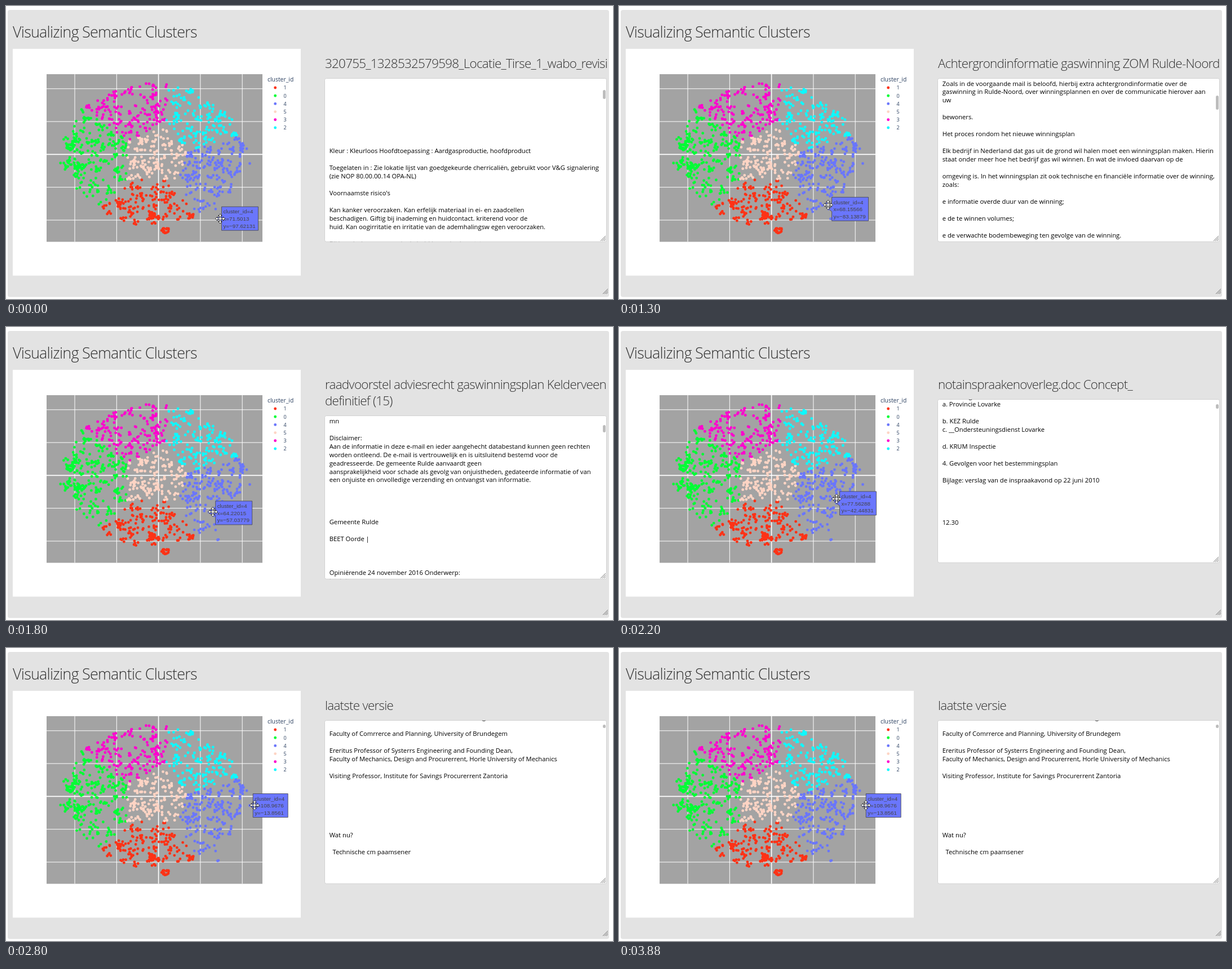
Recreate the animation shown at these times as an HTML page. Size 1077 px wide and 520 px high, loop 3980 ms.

```html
<!DOCTYPE html>
<html lang="en">
<head>
<meta charset="utf-8">
<title>Semantic clusters</title>
<style>
  html, body { margin: 0; width: 100%; height: 100%; overflow: hidden; background: #fff; }
  svg { display: block; width: 100vw; height: 100vh; font-family: "Open Sans", sans-serif; }
  text { white-space: pre; }
  .h2 { font-size: 26.95px; font-weight: 300; letter-spacing: -.745px; fill: #323232; }
  .h3 { font-size: 22.42px; font-weight: 300; letter-spacing: -.745px; fill: #323232; }
  .body { font-size: 11.24px; fill: #000; }
  .legend { font-size: 9px; fill: #2a3f5f; }
  .legend-title { font-size: 10.4px; fill: #2a3f5f; }
  .tip { font: 9.8px "Liberation Sans", Arial, sans-serif; fill: #444; }
  .dots { fill: none; stroke-width: 4.9; stroke-linecap: round; }
  .grid { stroke: #fff; }
</style>
</head>
<body>
<svg id="stage" viewBox="0 0 1077 520">
  <clipPath id="panelClip"><rect x="3" y="7" width="1066.5" height="509"/></clipPath>
  <rect x="3" y="7" width="1067" height="509.5" rx="4" fill="#e3e3e3"/>
  <text class="h2" x="12" y="55.7">Visualizing Semantic Clusters</text>
  <rect x="12" y="76" width="511" height="402.5" fill="#fff"/>
  <rect x="72" y="121" width="383" height="297.5" fill="#a3a3a3"/>
  <g id="plot"></g>
  <text class="legend-title" x="464" y="134">cluster_id</text>
  <g id="docs" clip-path="url(#panelClip)"></g>
  <g id="tips"></g>
  <path id="cursor" d="M0-8.5L3.5-5H1.2V-1.2H5V-3.5L8.5 0 5 3.5V1.2H1.2V5H3.5L0 8.5-3.5 5H-1.2V1.2H-5V3.5L-8.5 0-5-3.5V-1.2H-1.2V-5H-3.5Z" fill="#fff" stroke="#222"/>
</svg>
<script>
const LOOP = 3980;
const LINE = 14.97;
const byId = id => document.getElementById(id);

function add(parent, tag, attrs = {}, text) {
  const node = document.createElementNS('http://www.w3.org/2000/svg', tag);
  for (const key in attrs) node.setAttribute(key, attrs[key]);
  if (text !== undefined) node.textContent = text;
  return parent.appendChild(node);
}

let seed = 20;
function rand() {
  seed = (seed + 0x6D2B79F5) | 0;
  let r = Math.imul(seed ^ (seed >>> 15), 1 | seed);
  r = (r + Math.imul(r ^ (r >>> 7), 61 | r)) ^ r;
  return ((r ^ (r >>> 14)) >>> 0) / 4294967296;
}

const lastVersion = {
  title: 'laatste versie', point: ['108.9676', '−13.8561'], thumb: [136, 6], top: 126.5,
  text: `Docent bestuur en economie aan het centrum voor gas

Faculty of Comrrerce and Planning, Uhiversity of Brundegem

Ereritus Professor of Systerrs Engineering and Founding Dean,
Faculty of Mechanics, Design and Procurerrent, Horle University of Mechanics

Visiting Professor, Institute for Savings Procurerrent Zantoria






Wat nu?

  Technische cm paamsener`
};

const docs = [
  { from: 0, title: '320755_1328532579598_Locatie_Tirse_1_wabo_revisi', point: ['71.5013', '−97.62131'], thumb: [149, 16], top: 261,
    text: `Kleur : Kleurloos Hoofdtoepassing : Aardgasproductie, hoofdproduct

Toegelaten in : Zie lokatie lijst van goedgekeurde cherricaliën, gebruikt voor V&G signalering
(zie NOP 80.00.00.14 OPA-NL)

Voornaamste risico's

Kan kanker veroorzaken. Kan erfelijk materiaal in ei- en zaadcellen
beschadigen. Giftig bij inademing en huidcontact. kriterend voor de
huid. Kan oogirritatie en irritatie van de ademhalingsw egen veroorzaken.

Bij langdurige opname via de huid kan schade ontstaan` },
  { from: 410, title: '1324187_1401686703041_Bijlage_1_Appendix_2_WIK', point: ['70.55786', '−98.1208'], thumb: [137, 6], top: 126.5,
    text: `Document 4 uit de serie over apparatuur

ZOM Werkvloerinstructiekaart

Synoniemen
Leverancier + ErvonTolnik Fysische toestand : Vloeistof (Organisch)
Gebruik : Hydraulische olie Geur : Kenmerkende geur

Kleur :Rood Kk #
v,

BIG-classificatie
R-zinnen
20-38- 51/53
S-zinnen

Schadelijk Milieugevaarlijk (46) - 61

Na inademing Bij hoge damp- Frisse lucht, rust en direct spoedeisende
Schadelijk bij inademen. BIJ BLOOTSTELLING AAN HOGE /gasconcentrati hulp door
schadelijk voor de longen` },
  { from: 1190, title: 'Achtergrondinformatie gaswinning ZOM Rulde-Noord', point: ['68.15566', '−83.13879'], thumb: [159, 25], top: 141.5,
    text: `Zoals in de voorgaande mail is beloofd, hierbij extra achtergrondinformatie over de
gaswinning in Rulde-Noord, over winningsplannen en over de communicatie hierover aan
uw

bewoners.

Het proces rondom het nieuwe winningsplan

Elk bedrijf in Nederland dat gas uit de grond wil halen moet een winningsplan maken. Hierin
staat onder meer hoe het bedrijf gas wil winnen. En wat de invloed daarvan op de

omgeving is. In het winningsplan zit ook technische en financiële informatie over de winning,
zoals:

e informatie overde duur van de winning;

e de te winnen volumes;

e de verwachte bodembeweging ten gevolge van de winning.` },
  { from: 1390, title: 'raadvoorstel adviesrecht gaswinningsplan Kelderveen\ndefinitief (15)', point: ['64.22015', '−57.03779'], thumb: [174, 13], top: 170.7,
    text: `mn

Disclaimer:
Aan de informatie in deze e-mail en ieder aangehecht databestand kunnen geen rechten
worden ontleend. De e-mail is vertrouwelijk en is uitsluitend bestemd voor de
geadresseerde. De gemeente Rulde aanvaardt geen
aansprakelijkheid voor schade als gevolg van onjuistheden, gedateerde informatie of van
een onjuiste en onvolledige verzending en ontvangst van informatie.




Gemeente Rulde

BEET Oorde |



Opiniërende 24 november 2016 Onderwerp:
besluit` },
  { from: 2080, title: 'notainspraakenoverleg.doc Concept_', point: ['77.56288', '−42.44831'], thumb: [137, 8], top: 126.5,
    text: `3. Overleg
a. Provincie Lovarke

b. KEZ Rulde
c. __Ondersteuningsdienst Lovarke

d. KRUM Inspectie

4. Gevolgen voor het bestemmingsplan

Bijlage: verslag van de inspraakavond op 22 juni 2010




12.30` },
  { from: 2680, ...lastVersion },
  { from: 3070, title: 'reactie op zienswijzen ontwerp gaswinningsplan\nbijlage (2)', point: ['105.3142', '8.73214'], thumb: [168, 10], top: 170.7,
    text: `Onderwerp: reactie op de zienswijzen

De gemeente heeft kennis genomen van het ontwerp van het winningsplan
en de daarbij behorende stukken.

Advies

De raad wordt gevraagd om in te stemmen met het voorstel.



Bijlage: overzicht van de zienswijzen` },
  { from: 3860, ...lastVersion }
];

// Data units to stage pixels
const plotX = x => 270.6 + x * 1.486;
const plotY = y => 263.4 - y * 1.166;
const pointOf = doc => [plotX(+doc.point[0]), plotY(+doc.point[1].replace('−', '-'))];

for (let v = -100; v <= 100; v += 50) {
  const width = v ? 1 : 1.6;
  add(byId('plot'), 'path', { class: 'grid', 'stroke-width': width, d: `M${plotX(v)} 121v297.5M72 ${plotY(v)}h383` });
}

// Every dot takes the colour of its nearest centre
const clusters = [
  { id: 1, color: '#fd3216', x: 262, y: 352 },
  { id: 0, color: '#00fe35', x: 165, y: 266 },
  { id: 4, color: '#6a76fc', x: 362, y: 299 },
  { id: 5, color: '#fed4c4', x: 265, y: 267 },
  { id: 3, color: '#fe00ce', x: 231, y: 185 },
  { id: 2, color: '#0df9ff', x: 335, y: 199 }
];

// Short random chains inside an ellipse, a few dense clumps and the hovered dots
function scatter() {
  const dots = [];
  const polar = (x, y, rx, ry, power) => {
    const angle = rand() * 2 * Math.PI, r = rand() ** power;
    return [x + rx * r * Math.cos(angle), y + ry * r * Math.sin(angle)];
  };
  const isFree = ([x, y]) => dots.every(d => Math.hypot(d[0] - x, d[1] - y) > 4);
  while (dots.length < 1120) {
    const last = dots[dots.length - 1];
    const chained = last && rand() < .42;
    const dot = chained ? polar(...last, 6, 5, .5) : polar(262, 262, 160, 125, .56);
    if (chained || isFree(dot)) dots.push(dot);
  }
  for (const [x, y] of [[283, 397], [326, 372], [258, 369], [113, 251], [133, 285]])
    for (let i = 0; i < 16; i++) dots.push(polar(x, y, 7, 6, .5));
  return dots.concat(docs.map(pointOf));
}

const distance = (c, [x, y]) => Math.hypot(c.x - x, c.y - y);
const nearest = dot => clusters.reduce((a, b) => distance(a, dot) < distance(b, dot) ? a : b);
const dots = scatter();

clusters.forEach((c, i) => {
  const y = 145 + i * 14.2;
  const d = dots.filter(dot => nearest(dot) === c).map(([dx, dy]) => `M${dx} ${dy}h0`).join('');
  add(byId('plot'), 'path', { class: 'dots', stroke: c.color, d: `${d}M477.7 ${y}h0` });
  add(byId('plot'), 'text', { class: 'legend', x: 492.5, y: y + 3.4 }, c.id);
});

function grip(parent, x, y) {
  add(parent, 'path', { d: `M${x - 9} ${y}l9-9M${x - 6} ${y}l6-6M${x - 3} ${y}l3-3`, stroke: '#666', 'stroke-width': .9 });
}
grip(byId('stage'), 1068, 511);

function drawLines(parent, cls, text, x, y, step) {
  text.split('\n').forEach((line, i) => line && add(parent, 'text', { class: cls, x, y: y + i * step }, line));
}

function drawDoc(doc, index) {
  const group = add(byId('docs'), 'g');
  const top = doc.title.includes('\n') ? 157.5 : 128.5;
  const box = { x: 565.5, y: top, width: 500, height: 289.8, rx: 3 };
  drawLines(group, 'h3', doc.title, 566, 110, 29.06);
  add(group, 'rect', { ...box, fill: '#fff', stroke: '#d1d1d1' });
  add(add(group, 'clipPath', { id: 'area' + index }), 'rect', box);
  const body = add(group, 'g', { 'clip-path': `url(#area${index})` });
  drawLines(body, 'body', doc.text, 573.7, doc.top, LINE);
  add(group, 'rect', { x: 1059, y: doc.thumb[0], width: 5, height: doc.thumb[1], rx: 2.5, fill: '#bdbdbd' });
  grip(group, 1064, top + 288.5);
  return group;
}

function drawTip(doc) {
  const group = add(byId('tips'), 'g');
  const [x, y] = pointOf(doc);
  const width = doc.point[1].length > 8 ? 65 : 62;
  add(group, 'path', {
    d: `M${x} ${y}l5.7-4.5v-16.5h${width}v42h${-width}v-16.5z`,
    fill: '#6a76fc', stroke: '#444', 'stroke-width': .8
  });
  drawLines(group, 'tip', `cluster_id=4\nx=${doc.point[0]}\ny=${doc.point[1]}`, x + 8.6, y - 8.8, 12.6);
  return group;
}

const views = docs.map((doc, i) => ({ from: doc.from, nodes: [drawDoc(doc, i), drawTip(doc)] }));

// Pointer way points: time, x, y
const path = [
  [0, 380, 377.5], [550, 376, 376.5], [999, 376, 376.5], [1296, 371, 353], [1791, 367, 328],
  [2187, 386, 305], [2781, 441, 279], [3276, 427, 257], [3870, 438, 279], [LOOP, 438, 279]
];

// The pointer refreshes in steps rather than continuously
function stepTime(t) {
  if (t >= 900) return 900 + Math.floor((t - 900) / 99) * 99;
  return [550, 480, 410, 250, 0].find(s => t >= s);
}

function pointerAt(t) {
  const i = path.findIndex(p => p[0] > t);
  const [t0, x0, y0] = path[i - 1], [t1, x1, y1] = path[i];
  const k = (t - t0) / (t1 - t0);
  return [x0 + (x1 - x0) * k, y0 + (y1 - y0) * k];
}

function draw() {
  const t = performance.now() % LOOP;
  const current = views.filter(v => v.from <= t).pop();
  for (const view of views)
    for (const node of view.nodes) node.style.display = view === current ? '' : 'none';
  byId('cursor').setAttribute('transform', `translate(${pointerAt(stepTime(t))})`);
  requestAnimationFrame(draw);
}
draw();
</script>
</body>
</html>
```
